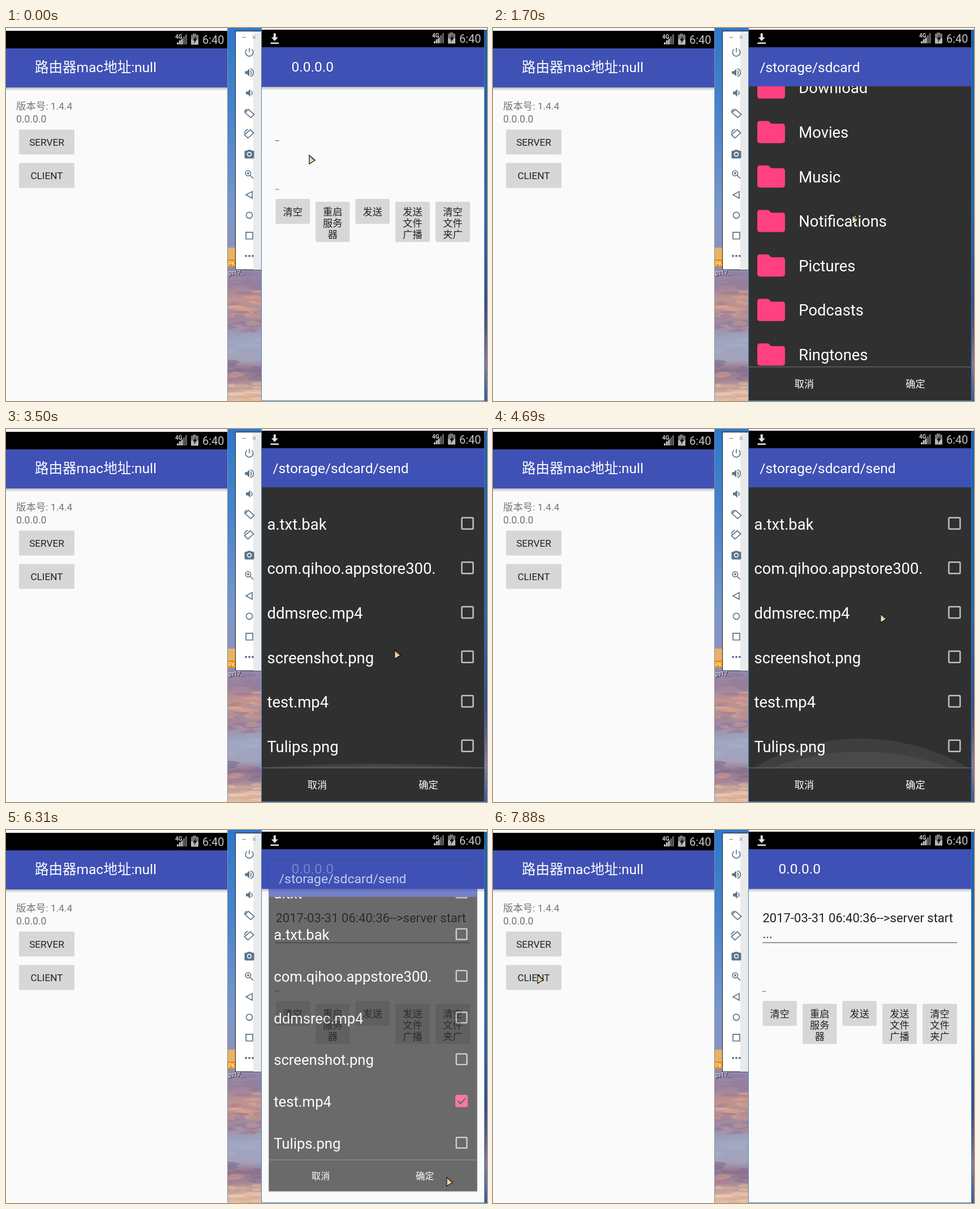
Animation of 850 by 659 pixels, one loop 8 s. Source, as an HTML page:

```html
<!DOCTYPE html>
<html lang="zh-CN">
<head>
<meta charset="utf-8">
<style>
html, body { margin: 0; width: 100%; height: 100%; overflow: hidden; background: #fafafa; }
svg { display: block; width: 850px; height: 659px; }
text { font-family: Roboto, "Noto Sans CJK SC", "Noto Sans CJK", sans-serif; white-space: pre; }
</style>
</head>
<body>
<svg id="stage" viewBox="0 0 850 659"></svg>
<script>
const BLUE = '#3f51b5', DARK = '#303030', PINK = '#ff4081', ROW = 78.6, LAST = 560.6;
const stage = document.getElementById('stage');
const $ = id => document.getElementById(id);

const rect = (x, y, w, h, fill, more = '') =>
  `<rect x="${x}" y="${y}" width="${w}" height="${h}" fill="${fill}" ${more}/>`;
const label = (x, y, size, fill, str, more = '') =>
  `<text x="${x}" y="${y}" font-size="${size}" fill="${fill}" ${more}>${str}</text>`;
const mid = (x, y, size, fill, str) => label(x, y, size, fill, str, 'text-anchor="middle"');
const path = (d, more) => `<path d="${d}" ${more}/>`;

// Desktop behind the windows
let seed = 7;
const rand = () => (seed = seed * 16807 % 2147483647) / 2147483647;

function clouds() {
  const bands = [
    [430, 462, ['#8d7b9c', '#a088a2', '#957f9c']],
    [460, 508, ['#d9a08e', '#b88790', '#a07b92', '#e2ae96']],
    [506, 536, ['#a1829a', '#c4968f', '#8f7c9c']],
    [536, 588, ['#9ba6c2', '#a9aec6', '#a3a2bd']],
    [590, 626, ['#806d8c', '#a88092', '#c99a92', '#8a7292']],
    [626, 659, ['#eccbae', '#e5b79f', '#dcab98']]
  ];
  let out = '';
  for (const [top, end, tones] of bands)
    for (let i = 0; i < 20; i++) {
      const x = 390 + rand() * 64, y = top + rand() * (end - top);
      out += `<ellipse cx="${x}" cy="${y}" rx="${6 + rand() * 16}" ry="${1.5 + rand() * 3}"
        fill="${tones[Math.floor(rand() * tones.length)]}" opacity=".6"/>`;
    }
  return out;
}

function desktop() {
  return rect(391, 0, 61, 659, 'url(#sky)') +
    `<g clip-path="url(#strip)">${clouds()}</g>` +
    rect(845, 0, 5, 659, 'url(#edge)') +
    rect(392, 388, 13, 21, '#e9b268') + rect(392, 409, 13, 13, '#e8920c') +
    label(392.5, 419.5, 10, '#fff', 'PK') +
    label(392, 435.5, 10, '#fff', 'gs17...', 'style="text-shadow:1px 1px 1px #000"');
}

// Emulator tool strip
function tools() {
  const icons = [
    ['M12 3v9M7 6a8 8 0 1 0 10 0'],
    ['M14 8a5 5 0 0 1 0 8M14 4a8.2 8.2 0 0 1 0 16', 'M3 9v6h4l5 5V4L7 9z'],
    ['M16 8a5 5 0 0 1 0 8', 'M5 9v6h4l5 5V4L9 9z'],
    ['M10 3.500L22 14L15 21L3 10.500zM2 9a9 9 0 0 1 5-6'],
    ['M14 3.500L21 10.500L9 21L2 14zM2 11a9 9 0 0 1 7-8'],
    ['', 'M9 3h6l2 2h3a2 2 0 0 1 2 2v12a2 2 0 0 1-2 2H4a2 2 0 0 1-2-2V7a2 2 0 0 1 2-2h3z'],
    ['M15 9.5a5.5 5.5 0 1 1-11 0a5.5 5.5 0 1 1 11 0M14 14l6 6M9.5 7v5M7 9.5h5'],
    ['M18 5v14L5 12z'],
    ['M18.5 12a6.5 6.5 0 1 1-13 0a6.5 6.5 0 1 1 13 0'],
    ['M5 5h14v14H5z'],
    ['', 'M3 10h4v4H3zM10 10h4v4h-4zM17 10h4v4h-4z']
  ];
  const ink = '#5b7488';
  let out = rect(405.5, 5.5, 46, 421.5, '#fff', 'stroke="#222"') +
    rect(437, 6, 14, 421, '#eaeaea') +
    path('M418 16.5h6M436 13.5l5 5.5M441 13.5l-5 5.5', 'stroke="#777" fill="none"');
  icons.forEach(([line, solid = ''], i) => {
    out += `<g transform="translate(419.8 ${32.6 + i * 36}) scale(.85)">` +
      path(line, `fill="none" stroke="${ink}" stroke-width="2"`) + path(solid, `fill="${ink}"`) + '</g>';
  });
  return out + '<circle cx="430" cy="223" r="3.4" fill="none" stroke="#fff" stroke-width="1.6"/>';
}

// Status bar items, placed for the left device
function status(dx, dy) {
  let bars = '';
  for (let i = 0; i < 5; i++)
    bars += rect(302 + i * 3.7, 25.5 - i * 3.6, 3, 3.5 + i * 3.6, i < 3 ? '#c8c8c8' : '#666');
  return `<g transform="translate(${dx} ${dy})">` + bars + rect(298, 9, 13, 11, '#000') +
    label(299, 19, 10, '#ccc', '4G', 'font-weight="700"') +
    path('M330 10h6v2h4v8h-13v-8h3z', 'fill="#777"') + rect(327, 20, 13, 9.5, '#b8b8b8') +
    path('M336 13.500l-6 8.500h3l-1 5.500l6-8.500h-3.500z', 'fill="#111"') +
    label(347, 28, 20, '#c4c4c4', '6:40') + '</g>';
}

const button = (x, y, w, h, lines, first) =>
  rect(x, y, w, h, '#d6d7d7', 'rx="2"') +
  lines.map((s, i) => mid(x + w / 2, first + i * 20, 17.2, '#222', s)).join('');

function leftDevice() {
  return rect(0, 0, 391, 659, '#fafafa') + rect(391, 0, 1, 659, '#8a8f9c') +
    rect(0, 5, 391, 31, '#000') + status(0, 0) +
    rect(0, 105, 391, 6, 'url(#shade)') + rect(0, 36, 391, 69, BLUE) +
    label(51, 78, 24.5, '#fff', '路由器mac地址:null') +
    label(18, 143.5, 17.4, '#757575', '版本号: 1.4.4') +
    label(18, 167.3, 17.6, '#757575', '0.0.0.0') +
    button(23, 179.5, 98, 44, ['SERVER'], 208) +
    button(23, 238.5, 98, 44, ['CLIENT'], 267);
}

function rightDevice() {
  return rect(452, 0, 393, 659, '#fafafa') +
    rect(452, 104, 393, 6, 'url(#shade)') + rect(452, 34, 393, 70, BLUE) +
    label(504.5, 76.5, 24.5, '#fff', '0.0.0.0') +
    rect(476, 198.4, 6.5, 1.2, '#555', 'id="rule"') +
    '<g id="log">' + label(476.5, 163.3, 22, '#222', '2017-03-31 06:40:36--&gt;server start') +
    label(476.5, 190.5, 22, '#222', '...') + '</g>' +
    rect(476, 284.4, 6.5, 1.2, '#777') +
    button(476.5, 302, 60.5, 44, ['清空'], 331) +
    button(547, 307, 60.5, 71, ['重启', '服务', '器'], 331) +
    button(617.5, 302, 60.5, 44, ['发送'], 331) +
    button(688, 307, 61, 71, ['发送', '文件', '广播'], 331) +
    button(759, 307, 61, 71, ['清空', '文件', '夹广'], 331);
}

// File picker
const dirs = ['..', 'Alarms', 'Android', 'DCIM', 'distribute', 'Download', 'Movies', 'Music',
  'Notifications', 'Pictures', 'Podcasts', 'Ringtones', 'send'];
const files = ['a.txt', 'a.txt.bak', 'com.qihoo.appstore300.', 'ddmsrec.mp4', 'screenshot.png',
  'test.mp4', 'Tulips.png'];
const END = ROW * dirs.length - 497;
const FOLDER = 'M10 4H4Q2 4 2 6V18Q2 20 4 20H20Q22 20 22 18V8Q22 6 20 6H12z';

function dirRow(name, i) {
  const y = LAST - (dirs.length - 1 - i) * ROW;
  return `<g transform="translate(462.1 ${y - 29.4}) scale(2.45)">${path(FOLDER, `fill="${PINK}"`)}</g>` +
    label(540.3, y + 10.2, 27.4, '#fff', name);
}

function fileRow(name, i) {
  const y = LAST - (files.length - 1 - i) * ROW;
  return label(461.5, y + 10.2, 27.4, '#fff', name) +
    rect(805.5, y - 10.9, 20, 20, 'none', 'rx="1.5" stroke="#c1c1c1" stroke-width="2.5"');
}

function picker() {
  const y = LAST - ROW;
  return '<g id="picker">' + rect(452, 34, 393, 624, DARK) + rect(452, 34, 393, 69, BLUE) +
    label(471.5, 77.5, 24.5, '#fff', '', 'id="title"') +
    '<g clip-path="url(#view)">' +
    `<g id="dirs">${dirs.map(dirRow).join('')}</g>` +
    '<g id="files">' + rect(452, y - 39.6, 393, ROW, '#555', 'id="press"') + files.map(fileRow).join('') +
    '<g id="tick">' + rect(804.2, y - 12.2, 22.5, 22.5, PINK, 'rx="2"') +
    path(`M808.5 ${y - 1}l5 5l9-9.5`, `fill="none" stroke="${DARK}" stroke-width="2.5"`) + '</g></g>' +
    '<path id="glow1" fill="#fff" opacity=".07"/><path id="glow2" fill="#fff" opacity=".05"/></g>' +
    rect(452, 598, 393, 1.3, '#686868') +
    mid(550, 635, 17.2, '#fff', '取消') + mid(746.5, 635, 17.2, '#fff', '确定') + '</g>';
}

const stops = list => list.map(([o, c]) => `<stop offset="${o}" stop-color="${c}"/>`).join('');
const grad = (id, list) =>
  `<linearGradient id="${id}" x2="0" y2="1">${stops(list)}</linearGradient>`;

stage.innerHTML = '<defs>' +
  grad('sky', [[0, '#2c78cc'], [.25, '#4a86cd'], [.5, '#7c98cc'], [.63, '#8e90b8'], [.68, '#93809f'],
    [.73, '#c0948f'], [.79, '#a08a9e'], [.84, '#9ea7c4'], [.89, '#a6a2b8'], [.92, '#8a7390'], [1, '#e6bea4']]) +
  grad('edge', [[0, '#1d5fae'], [.5, '#2d65ac'], [.74, '#3c4a85'], [.8, '#5a5380'], [.9, '#8f7698'], [1, '#3d5a94']]) +
  grad('shade', [[0, '#bbb'], [1, '#fafafa']]) +
  `<clipPath id="strip">${rect(392, 427, 60, 232)}</clipPath>` +
  `<clipPath id="view">${rect(452, 103, 393, 495)}</clipPath></defs>` +
  desktop() + tools() + leftDevice() + rightDevice() +
  rect(452, 34, 393, 624, '#000', 'id="dim" opacity=".6"') + picker() +
  rect(452, 0, 398, 3, '#f4f6f8') + rect(452, 3, 393, 31, '#000') + status(454, -2) +
  path('M472.8 9.5h4v7h4l-6 6.5l-6-6.5h4zM467.5 25.5h14.5v2.5h-14.5z', 'fill="#e4e4e4"') +
  rect(451, 3, 1, 656, '#4a86b8') + rect(845, 3, 1, 656, '#2f80c4') + rect(451, 658, 395, 1, '#2b8bd4') +
  '<g id="cursor">' +
  path('M.9 .9V16L11.2 9.4z', 'fill="#fff" stroke="#111" stroke-width="1.3"') +
  path('M2.2 3.5V8.5L6 6z', 'fill="#8fd0c0"') + path('M5.5 5L10 9L5 8.5z', 'fill="#e8503a"') +
  path('M2.3 9L7.5 9.2L2.3 13z', 'fill="#f8cf3c"') + '</g>';

const steps = [0, 120, 270, 420, 1010, 1130, 1280, 1400, 1550, 1670, 1820, 1940, 2060, 2210, 2330,
  2600, 2720, 2840, 2960, 3230, 3380, 3500, 3870, 3990, 4110, 4390, 4540, 4690, 4960, 5110,
  5380, 5500, 5650, 5770, 5890, 6040, 6310, 6460, 6580, 6700, 6850, 6970, 7090, 7210, 7360, 7480, 7760, 7880];

const moves = [[0, 535, 224], [420, 635, 319], [1130, 635, 319], [1400, 642, 520], [1670, 634, 330],
  [1940, 640, 455], [2330, 616, 566], [2600, 616, 566], [2960, 649, 459], [3500, 686, 390],
  [4110, 649, 452], [4690, 684, 326], [5110, 672, 484], [5500, 672, 484], [6040, 778, 613],
  [6310, 778, 613], [7210, 316, 331], [7480, 99, 256], [7880, 78, 255]];
const glows = [[0, 0], [1670, 0], [1940, 42], [2330, 7], [4110, 7], [4690, 51], [5110, 0]];
const scrolls = [[0, 0], [1280, 0], [1400, 60], [1550, 240], [1670, 430], [1820, END]];

function track(keys, t) {
  const i = keys.findIndex(k => k[0] > t);
  if (i < 0) return keys[keys.length - 1].slice(1);
  const a = keys[i - 1], b = keys[i], u = (t - a[0]) / (b[0] - a[0]);
  return a.slice(1).map((v, n) => v + (b[n + 1] - v) * u);
}

const show = (id, on) => $(id).setAttribute('visibility', on ? 'inherit' : 'hidden');
const set = (id, name, value) => $(id).setAttribute(name, value);

function arc(half, h) {
  if (h < .5) return '';
  const r = (half * half + h * h) / (2 * h);
  return `M${650 - half} 598A${r} ${r} 0 0 1 ${650 + half} 598z`;
}

function draw(now) {
  const t = steps.filter(s => s <= now).pop();
  const open = t >= 1010 && t < 6460, opening = t === 1010, closing = t === 6310;
  const inSend = t >= 2600, started = t > 2000;

  show('picker', open);
  show('dim', open && !closing);
  const s = opening ? .983 : closing ? .9375 : 1;
  set('picker', 'transform', `translate(648.5 346) scale(${s}) translate(-648.5 -346)`);
  set('picker', 'opacity', opening ? .96 : closing ? .71 : 1);

  show('log', started);
  set('rule', 'width', started ? 344 : 6.5);
  $('title').textContent = '/storage/sdcard' + (inSend ? '/send' : '');
  show('dirs', !inSend);
  show('files', inSend);
  set('dirs', 'transform', `translate(0 ${END - track(scrolls, t)[0]})`);
  set('files', 'transform', `translate(0 ${t >= 5110 ? 6.5 : t >= 4960 ? 3 : 0})`);
  set('press', 'opacity', t === 5380 ? 1 : t === 5500 ? .5 : 0);
  show('tick', t >= 5500);

  const h = track(glows, t)[0];
  set('glow1', 'd', arc(189, h));
  set('glow2', 'd', arc(155, h * .55));
  const [x, y] = track(moves, t);
  set('cursor', 'transform', `translate(${x} ${y})`);
}

function loop() {
  draw(performance.now() % 8000);
  requestAnimationFrame(loop);
}
loop();
</script>
</body>
</html>
```
